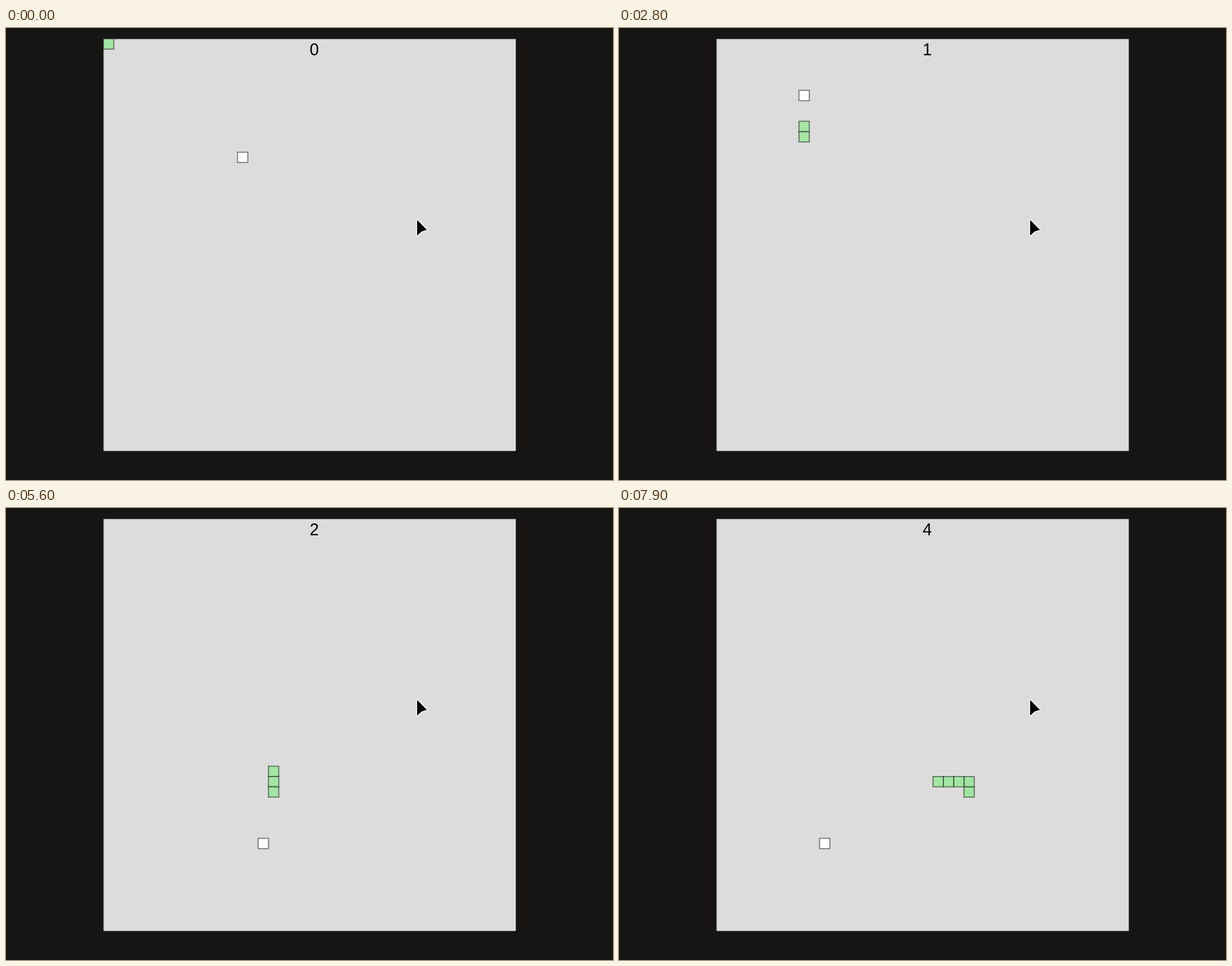
An HTML page with a canvas for the animation above (8000 ms loop, 867 by 646 pixels).

```html
<!DOCTYPE html>
<html lang="en">
<head>
<meta charset="utf-8">
<title>Snake</title>
<style>
  html, body { margin: 0; width: 100%; height: 100%; overflow: hidden; background: #161513; }
  canvas { display: block; }
</style>
</head>
<body>
<canvas id="stage" width="867" height="646"></canvas>
<script>
const ctx = document.getElementById('stage').getContext('2d');
const LOOP = 8000, TICK = 100;
const SIZE = 589.2, CELL = SIZE / 40, LEFT = 139.2, TOP = 15.5;

const ROUTE = 'R13 D13 L5 U10 R4 D4 R2 D3 R2 D18 L1 D6 R4 U5 R5 U4 L3';
const STEP = { R: [1, 0], L: [-1, 0], U: [0, -1], D: [0, 1] };
const FOOD = [[13, 11], [8, 5], [15, 31], [24, 28], [10, 31]];
const EATEN_AT = [24, 39, 78, 96];
// Game pace: [tick, cells travelled]
const PACE = [[0, 0], [9, 12], [11, 15], [18, 24], [27, 36], [36, 49], [39, 52],
  [45, 60], [54, 71], [55, 72], [63, 84], [67, 89], [72, 95], [78, 102]];

const path = [[0, 0]];
for (const leg of ROUTE.split(' ')) {
  const [dx, dy] = STEP[leg[0]];
  for (let i = 0; i < +leg.slice(1); i++) {
    const [x, y] = path[path.length - 1];
    path.push([x + dx, y + dy]);
  }
}

function travelled(tick) {
  const i = Math.max(1, PACE.findIndex(p => p[0] >= tick));
  const [t0, k0] = PACE[i - 1], [t1, k1] = PACE[i];
  return Math.floor(k0 + (k1 - k0) * (tick - t0) / (t1 - t0) + 1e-6);
}

function drawCell([col, row], fill) {
  const box = [LEFT + col * CELL, TOP + row * CELL, CELL, CELL];
  ctx.fillStyle = fill;
  ctx.fillRect(...box);
  ctx.strokeStyle = 'rgba(0, 0, 0, 0.5)';
  ctx.lineWidth = 1.47;
  ctx.strokeRect(...box);
}

function drawPointer() {
  ctx.beginPath();
  ctx.moveTo(587.2, 274.2);
  ctx.lineTo(601.3, 288.4);
  ctx.lineTo(593.8, 290.7);
  ctx.lineTo(587.2, 296.8);
  ctx.closePath();
  ctx.lineJoin = 'round';
  ctx.lineWidth = 2.4;
  ctx.strokeStyle = '#fff';
  ctx.stroke();
  ctx.fillStyle = '#000';
  ctx.fill();
  ctx.lineJoin = 'miter';
}

function draw(time) {
  const tick = Math.min(78, Math.max(0, Math.floor(time / TICK) - 1));
  const head = travelled(tick);
  const score = EATEN_AT.filter(k => head >= k).length;

  ctx.fillStyle = '#161513';
  ctx.fillRect(0, 0, 867, 646);

  ctx.save();
  ctx.beginPath();
  ctx.rect(LEFT, TOP, SIZE, SIZE);
  ctx.clip();
  ctx.fillStyle = '#dcdcdc';
  ctx.fillRect(LEFT, TOP, SIZE, SIZE);

  ctx.fillStyle = '#000';
  ctx.font = '23.57px "Liberation Sans", Arial, sans-serif';
  ctx.fillText(score, LEFT + SIZE / 2, 39);

  drawCell(FOOD[score], '#fff');
  for (let k = Math.max(0, head - score); k <= head; k++) drawCell(path[k], '#a2e6a3');
  ctx.restore();

  drawPointer();
}

const start = performance.now();
function frame() {
  draw((performance.now() - start) % LOOP);
  requestAnimationFrame(frame);
}
frame();
</script>
</body>
</html>
```
